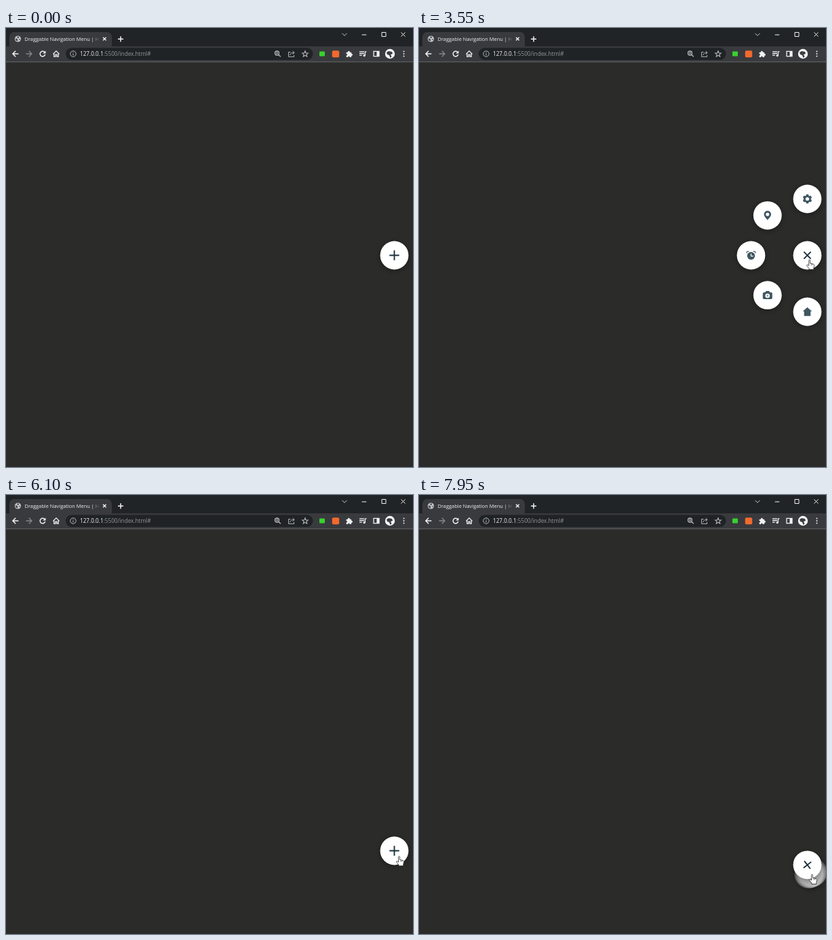
These frames come from a looping animation (600 by 646 pixels, 8000 ms). An HTML page with a canvas:

```html
<!DOCTYPE html>
<html lang="en">
<head>
<meta charset="utf-8">
<title>Draggable Navigation Menu</title>
<style>
html, body { margin: 0; width: 100%; height: 100%; overflow: hidden; background: #2b2c2a; }
canvas { display: block; width: 600px; height: 646px; }
</style>
</head>
<body>
<canvas id="stage"></canvas>
<script>
const W = 600, H = 646, LOOP = 8000, STEP = 50, TAU = Math.PI * 2, RAD = Math.PI / 180;
const canvas = document.getElementById('stage');
const ctx = canvas.getContext('2d');
const dpr = window.devicePixelRatio || 1;
canvas.width = W * dpr;
canvas.height = H * dpr;

const FONT = '"Open Sans", "Noto Sans", sans-serif';
const INK = '#1b313a', ICON = '#405761';
const CENTER_X = 572.5, RADIUS = 20.9, REACH = 83, DURATION = 500;

// Menu clicks: [start, open?]
const clicks = [[3000, 1], [4166, 0], [6249, 1], [6900, 0], [7880, 1]];
// [time, toggle y]
const drag = [[0, 334.5], [4700, 334.5], [5050, 543.5], [5400, 543.5],
  [5650, 523.5], [7450, 523.5], [7600, 544.3]];
// [time, x, y]
const pointer = [[1500, 455, 30], [1600, 462.5, 53], [1750, 476, 92], [2400, 560, 590],
  [2550, 568, 560], [2600, 572, 545], [2900, 571, 356], [2950, 568.5, 347],
  [3400, 575, 342], [4200, 578.5, 338.5], [4700, 580, 342], [5050, 586, 552],
  [5100, 588, 557], [5200, 594, 613], [5300, 594, 622], [5400, 593, 615],
  [5650, 584, 540], [6250, 578, 529], [6550, 577.5, 528], [7450, 578, 530],
  [7600, 579, 557], [7950, 579.5, 558.5]];
// [from, cursor shape]
const shapes = [[1500, 'arrow'], [2900, 'hand'], [4700, 'grab'], [5800, 'hand'],
  [7450, 'grab'], [7650, 'hand']];

function sample(keys, t) {
  if (t <= keys[0][0]) return keys[0].slice(1);
  for (let i = 1; i < keys.length; i++) {
    const a = keys[i - 1], b = keys[i];
    if (t > b[0]) continue;
    const k = (t - a[0]) / (b[0] - a[0]);
    return a.slice(1).map((v, j) => v + (b[j + 1] - v) * k);
  }
  return keys[keys.length - 1].slice(1);
}

// cubic-bezier(.25, .1, .25, 1)
function ease(x) {
  if (x <= 0) return 0;
  if (x >= 1) return 1;
  let lo = 0, hi = 1, s = 0.5;
  for (let i = 0; i < 24; i++) {
    s = (lo + hi) / 2;
    if (0.75 * s * (1 - s) + s ** 3 < x) lo = s; else hi = s;
  }
  return 0.3 * s * (1 - s) ** 2 + 3 * s * s * (1 - s) + s ** 3;
}

function openness(t) {
  let p = 0;
  for (const [start, open] of clicks) {
    if (t < start) break;
    const k = ease((t - start) / DURATION);
    p = open ? k : 1 - k;
  }
  return p;
}

function at(x, y, draw, turn = 0) {
  ctx.save();
  ctx.translate(x, y);
  ctx.rotate(turn);
  draw();
  ctx.restore();
}

function disc(x, y, r, color) {
  ctx.fillStyle = color;
  ctx.beginPath();
  ctx.arc(x, y, r, 0, TAU);
  ctx.fill();
}

function box(x, y, w, h, r, color) {
  ctx.fillStyle = color;
  ctx.beginPath();
  ctx.roundRect(x, y, w, h, r);
  ctx.fill();
}

function line(d, color, width = 1.2) {
  ctx.strokeStyle = color;
  ctx.lineWidth = width;
  ctx.stroke(new Path2D(d));
}

function shape(d, color) {
  ctx.fillStyle = color;
  ctx.fill(new Path2D(d), 'evenodd');
}

function text(str, x, y, size, color) {
  ctx.font = `${size}px ${FONT}`;
  ctx.fillStyle = color;
  ctx.fillText(str, x, y);
}

function star(r1, r2) {
  let d = '';
  for (let i = 0; i < 10; i++) {
    const r = i % 2 ? r2 : r1, a = i * Math.PI / 5 - Math.PI / 2;
    d += `${i ? 'L' : 'M'}${r * Math.cos(a)} ${r * Math.sin(a)}`;
  }
  return d + 'Z';
}

function tabStrip() {
  box(0, 0, W, 28, 0, '#212426');
  box(5, 6, 151, 26, 7, '#393a3e');
  at(17.5, 16, () => {
    disc(0, 0, 4.6, '#c4c7ca');
    shape('M-3.4 -1L-1 0L0 2L-1 3.5C-3 2.8 -3.8 1 -3.4 -1ZM-1 -3.6L1.8 -3.2L1 -1L-1 -1.4ZM1.5 .3L3.6 0L2.6 2.4Z', '#45474b');
  });
  const fade = ctx.createLinearGradient(127, 0, 138, 0);
  fade.addColorStop(0, '#eef0f1');
  fade.addColorStop(1, 'rgba(238,240,241,0)');
  text('Draggable Navigation Menu | H', 27.5, 19, 7.45, fade);
  at(145.3, 16, () => line('M-2.3 -2.3L2.3 2.3M2.3 -2.3L-2.3 2.3', '#f1f2f3', 1.4));
  at(169, 16.2, () => line('M-4 0H4M0 -4V4', '#f1f2f3', 1.5));
  at(499, 9.5, () => line('M-3.5 -1.7L0 1.8L3.5 -1.7', '#c5c7c8', 1));
  at(528, 10, () => line('M-3.3 0H3.3', '#f1f2f3', 1));
  at(557, 9.5, () => line('M-3 -3H3V3H-3Z', '#f1f2f3', 1));
  at(585.5, 9.5, () => line('M-3 -3L3 3M3 -3L-3 3', '#f1f2f3', 1));
}

function toolbar() {
  const light = '#f1f2f3', dim = '#b6b9bc';
  box(0, 27, W, 23, 0, '#393a3e');
  box(0, 49, W, 1.4, 0, '#55575a');
  box(88, 29.2, 364.5, 17.8, 8.9, '#202325');
  at(14, 38, () => line('M4.4 0H-4M.2 -4.2L-4 0L.2 4.2', light, 1.5));
  at(34, 38, () => line('M-4.4 0H4M-.2 -4.2L4 0L-.2 4.2', '#85888b', 1.3));
  at(54, 38, () => {
    line('M3.4 -1.7A3.8 3.8 0 1 0 3.7 1', light, 1.5);
    shape('M4.5 -4.6V-.4H.3Z', light);
  });
  at(74, 38, () => line('M-4.6 .4L0 -4.1L4.6 .4M-3.2 -.5V4.2H-1V1.2H1V4.2H3.2V-.5', light, 1.3));
  at(99, 38, () => {
    line('M4.2 0A4.2 4.2 0 1 1 -4.2 0A4.2 4.2 0 1 1 4.2 0', dim, 1);
    line('M0 -.6V2.3M0 -2.5V-1.4', dim, 1.1);
  });
  text('127.0.0.1', 109, 41.2, 8.2, light);
  const hostWidth = ctx.measureText('127.0.0.1').width;
  text(':5500/index.html#', 109 + hostWidth, 41.2, 8.2, '#94989b');
  at(400.5, 38, () => {
    line('M2 -1A3 3 0 1 1 -4 -1A3 3 0 1 1 2 -1M1.2 1.3L4.4 4.3', dim, 1.3);
    line('M-2.6 -1H.6M-1 -2.6V.6', dim, 1);
  });
  at(421, 38.3, () => {
    line('M-1.5 -2.8H-4.4V4H3.6V1.5', dim, 1);
    line('M-2.2 1.6C-1.8 -1 0 -2 3.8 -2M1.6 -4.2L4.2 -2L1.6 .2', dim, 1);
  });
  at(441, 38.3, () => line(star(4.6, 2), dim, 1.1));
  box(462, 34.5, 8, 7, 1, '#38d22d');
  box(480.8, 33.2, 10.4, 10, 2, '#f26a2c');
  at(506, 38.3, () => {
    box(-4.4, -2.6, 7.6, 7.2, 0.8, light);
    disc(-0.6, -3, 1.5, light);
    disc(3.4, 1, 1.5, light);
    disc(-4.2, 1, 1.2, '#393a3e');
    disc(-0.6, 4.5, 1.2, '#393a3e');
  });
  at(526, 38, () => {
    line('M-5 -3.2H2M-5 -.5H2M-5 2.2H-1.2M3.4 2.5V-3.2H5.5', light, 1.3);
    disc(2.2, 2.6, 1.6, light);
  });
  at(546, 38, () => {
    line('M-4 -3.6H4V3.6H-4Z', light, 1.3);
    box(0.5, -3.6, 3.5, 7.2, 0, light);
  });
  disc(566, 38, 7.2, '#f6f6f6');
  shape('M561 36L564 34L569 35L570 38L567 39L568.5 42L566.5 44L565 40L562 39Z', '#3c3d3f');
  for (const y of [34.5, 38, 41.5]) disc(586.5, y, 1, light);
}

const icons = [
  function home() {
    shape('M0 -6.6L6.8 -.4H4.8V6.2H1.4V2.4H-1.4V6.2H-4.8V-.4H-6.8Z', ICON);
    box(-1.6, 2, 3.2, 4.3, 0, ICON);
  },
  function camera() {
    box(-7, -4.2, 14, 10, 1.8, ICON);
    shape('M-3.6 -4L-2.2 -6.2H2.2L3.6 -4Z', ICON);
    disc(0, 0.8, 3.3, '#fff');
    disc(0, 0.8, 1.4, '#8d9ba1');
  },
  function alarm() {
    disc(0, 0.8, 5.7, ICON);
    line('M-6.6 -3.2A2.6 2.6 0 0 1 -3.2 -5.8M6.6 -3.2A2.6 2.6 0 0 0 3.2 -5.8', ICON, 1.3);
    line('M0 -2.6V1.2H3.4', '#fff', 1.2);
  },
  function pin() {
    shape('M0 6.6C-2.4 4 -5.3 1.2 -5.3 -1.6A5.3 5.1 0 0 1 5.3 -1.6C5.3 1.2 2.4 4 0 6.6Z', ICON);
    disc(0, -1.6, 2.5, '#fff');
  },
  function gear() {
    for (let i = 0; i < 6; i++) at(0, 0, () => box(-1.9, -6.8, 3.8, 4, 1, ICON), i * TAU / 6);
    disc(0, 0, 5.3, ICON);
    disc(0, 0, 2.6, '#fff');
  }
];

function button(x, y, draw, turn) {
  ctx.save();
  ctx.shadowColor = 'rgba(0,0,0,.4)';
  ctx.shadowBlur = 9 * dpr;
  ctx.shadowOffsetY = 1.5 * dpr;
  disc(x, y, RADIUS, '#fff');
  ctx.restore();
  at(x, y, draw, turn);
}

function menu(t) {
  const y = sample(drag, t)[0], p = openness(t);
  if (p > 0) {
    ctx.globalAlpha = Math.min(1, p * 1.6);
    icons.forEach((icon, i) => {
      const spread = 45 * (i + 1);
      const a = (45 + spread * p) * RAD, d = REACH * p;
      button(CENTER_X + d * Math.cos(a), y + d * Math.sin(a), icon, spread * (p - 1) * RAD);
    });
    ctx.globalAlpha = 1;
  }
  button(CENTER_X, y, () => line('M-7.2 0H7.2M0 -7.2V7.2', INK, 1.9), 315 * p * RAD);
}

const cursors = {
  arrow() {
    const d = 'M0 0V10.4L2.4 8.2L4 11.8L5.7 11L4.1 7.6H7.3Z';
    line(d, '#1a1a1a', 1);
    shape(d, '#fff');
  },
  hand() {
    const d = 'M-1 .8C-1 -.5 1 -.5 1 .8V5L2.6 5.2L4.4 5.7L6 6.2C7 6.6 7.2 7.4 7.1 8.2L6.2 12V14H-.6V12.6L-4 8.3C-4.4 7 -3 6.6 -2.2 7.4L-1 8.6Z';
    shape(d, '#fff');
    line(d, '#26292b', 0.8);
    line('M2.6 5.4V8M4.4 5.9V8', '#26292b', 0.6);
  },
  grab() {
    const d = 'M-2.4 5.8L-5.4 1.6C-5.8 .5 -4.4 .1 -3.4 1.2L-2.8 1.8L-4 -2.8C-3.8 -4.2 -2.6 -3.8 -2.3 -2.8L-1.5 -.6L-1.5 -4.6C-1.2 -5.8 0 -5.6 .2 -4.6L.5 -.8L1.4 -4.2C2 -5.2 3 -4.8 3 -3.8L2.5 -.3L3.8 -2.4C4.6 -3 5.4 -2.4 5 -1.4L3.8 3.4L2.8 5.8Z';
    line(d, '#1a1a1a', 1);
    shape(d, '#fff');
  }
};

function cursor(t) {
  const now = shapes.filter(([from]) => t >= from).pop();
  if (!now) return;
  const [x, y] = sample(pointer, t);
  at(x, y, cursors[now[1]]);
}

function render(t) {
  ctx.setTransform(dpr, 0, 0, dpr, 0, 0);
  box(0, 0, W, H, 0, '#2b2c2a');
  tabStrip();
  toolbar();
  menu(t);
  cursor(t);
}

const begin = performance.now();
function tick() {
  const t = (performance.now() - begin) % LOOP;
  render(Math.floor(t / STEP) * STEP);
  requestAnimationFrame(tick);
}
tick();
</script>
</body>
</html>
```
